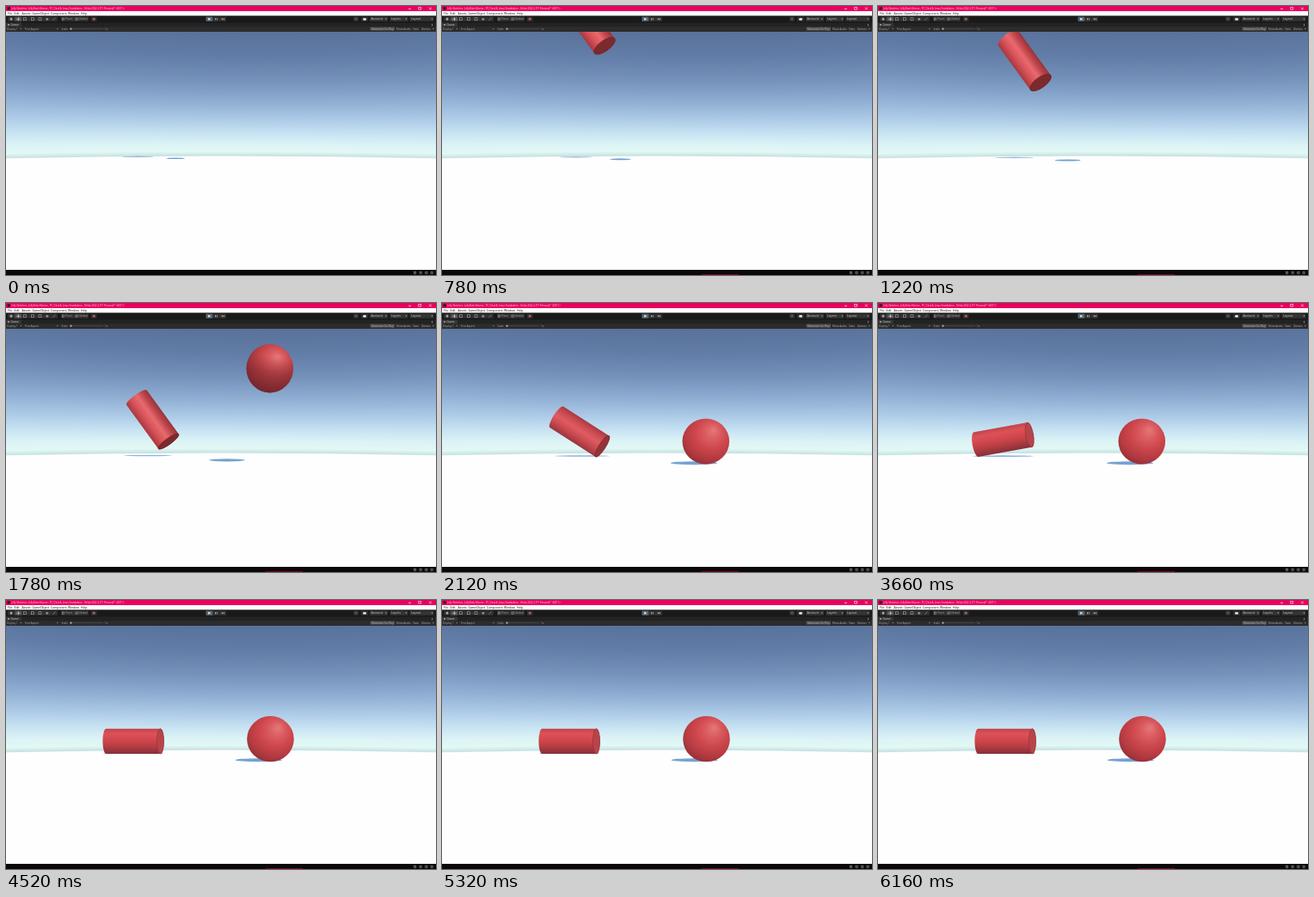
An HTML page with a canvas for the animation above (6180 ms loop, 500x313 px).

```html
<!DOCTYPE html>
<html lang="en">
<head>
<meta charset="utf-8">
<title>Falling shapes</title>
<style>
html, body { margin: 0; width: 100%; height: 100%; overflow: hidden; background: #000; }
canvas { display: block; width: 500px; height: 313px; }
</style>
</head>
<body>
<canvas id="stage" width="500" height="313"></canvas>
<script>
const LOOP = 6.18, W = 500, H = 313;
const VIEW = { top: 30, bottom: 307 };
const stage = document.getElementById('stage').getContext('2d');

const lerp = (a, b, u) => a + (b - a) * u;
const clamp = (v, a = 0, b = 1) => Math.min(b, Math.max(a, v));
const rad = deg => deg * Math.PI / 180;

// Piecewise linear curve through [position, value] points
function along(points, x) {
  if (x <= points[0][0]) return points[0][1];
  for (let i = 1; i < points.length; i++) {
    const [x0, y0] = points[i - 1], [x1, y1] = points[i];
    if (x <= x1) return lerp(y0, y1, (x - x0) / (x1 - x0));
  }
  return points[points.length - 1][1];
}

function mix(a, b, u) {
  const part = (c, i) => parseInt(c.substr(1 + 2 * i, 2), 16);
  return 'rgb(' + [0, 1, 2].map(i => Math.round(lerp(part(a, i), part(b, i), u))) + ')';
}

function stops(gradient, list) {
  list.forEach(([at, color]) => gradient.addColorStop(at, color));
  return gradient;
}

function rect(c, x, y, w, h, color) {
  c.fillStyle = color;
  c.fillRect(x, y, w, h);
}

function oval(c, x, y, rx, ry, color) {
  c.fillStyle = color;
  c.beginPath();
  c.ellipse(x, y, rx, ry, 0, 0, 2 * Math.PI);
  c.fill();
}

function label(c, text, x, y, size, color) {
  c.font = size + 'px "Open Sans", "Noto Sans", sans-serif';
  c.fillStyle = color;
  c.fillText(text, x, y);
}

function frameBox(c, x, y, w, h, color) {
  c.strokeStyle = color;
  c.lineWidth = 0.6;
  c.strokeRect(x, y, w, h);
}

function triangle(c, x, y, w, h, color, down) {
  c.fillStyle = color;
  c.beginPath();
  c.moveTo(x, y);
  if (down) { c.lineTo(x + w, y); c.lineTo(x + w / 2, y + h); }
  else { c.lineTo(x + w, y + h / 2); c.lineTo(x, y + h); }
  c.fill();
}

function drawSky(c) {
  const colors = [[0, '#58719a'], [0.2, '#617ca6'], [0.4, '#7592bb'], [0.58, '#91b0d4'],
    [0.72, '#afcde8'], [0.83, '#cae5f3'], [0.91, '#ddf4f6'], [0.965, '#e1f8f4'], [1, '#c4dfe1']];
  for (let x = 0; x < W; x += 2) {
    const bend = 0.0002 * (x - 300) ** 2;
    const g = c.createLinearGradient(0, 29 - bend, 0, 174.5 + 0.00005 * (x - 250) ** 2);
    rect(c, x, VIEW.top, 2, 150, stops(g, colors));
  }
  c.fillStyle = '#fefefe';
  c.beginPath();
  c.moveTo(0, 177.3);
  c.quadraticCurveTo(250, 171.7, W, 177.3);
  c.lineTo(W, VIEW.bottom);
  c.lineTo(0, VIEW.bottom);
  c.fill();
}

function drawTitle(c) {
  rect(c, 0, 0, W, 6, '#ea005e');
  rect(c, 1.5, 1.2, 3.2, 3.2, '#222');
  label(c, 'Jelly Sketches - JellySketchScene - PC, Desk & Linux Standalone - Veldo 2022.2.7f1 Personal* <DX11>',
    6.5, 4.2, 2.85, '#ffe4ee');
  rect(c, 468, 2.8, 3, 0.7, '#fff');
  frameBox(c, 479.8, 1.5, 2.6, 2.6, '#fff');
  c.strokeStyle = '#fff';
  c.beginPath();
  c.moveTo(492, 1.5); c.lineTo(494.8, 4.3);
  c.moveTo(494.8, 1.5); c.lineTo(492, 4.3);
  c.stroke();

  rect(c, 0, 6, W, 5.5, '#fff');
  [['File', 2], ['Edit', 9.5], ['Assets', 18.5], ['GameObject', 30.5], ['Component', 52],
    ['Window', 72], ['Help', 87]].forEach(([s, x]) => label(c, s, x, 10, 3.4, '#111'));
}

function drawToolbar(c) {
  const ink = '#a5a5a5';
  rect(c, 0, 11.5, W, 8, '#191919');
  rect(c, 2, 12.6, 58, 5.2, '#303030');
  rect(c, 10.3, 12.6, 8, 5.2, '#505050');
  oval(c, 6, 15.2, 1.4, 1.6, ink);
  rect(c, 12.2, 14.9, 4.4, 0.7, '#ccc');
  rect(c, 14.05, 13, 0.7, 4.4, '#ccc');
  [22, 31, 39.5].forEach(x => frameBox(c, x - 1.5, 13.7, 3, 3, ink));
  oval(c, 47.8, 15.2, 1.5, 1.5, '#888');
  c.strokeStyle = ink;
  c.beginPath();
  c.moveTo(54.5, 16.8); c.lineTo(57.5, 13.6);
  c.stroke();

  rect(c, 64, 12.6, 32, 5.2, '#303030');
  frameBox(c, 65.4, 14, 2.2, 2.2, ink);
  label(c, 'Pivot', 69, 16.4, 3.4, '#a5a5a5');
  frameBox(c, 81, 14, 2.2, 2.2, ink);
  label(c, 'Global', 84.5, 16.4, 3.4, '#a5a5a5');
  rect(c, 99, 12.6, 6.5, 5.2, '#303030');
  rect(c, 100.8, 14, 2.8, 2.4, '#b0605f');

  rect(c, 232.5, 12.6, 8, 5.2, '#566673');
  rect(c, 240.8, 12.6, 15.4, 5.2, '#303030');
  triangle(c, 235.3, 13.7, 2.8, 3, '#fff');
  rect(c, 243.2, 14, 0.8, 2.5, '#bbb');
  rect(c, 244.8, 14, 0.8, 2.5, '#bbb');
  triangle(c, 250.8, 14, 2.1, 2.5, '#bbb');
  rect(c, 253.1, 14, 0.7, 2.5, '#bbb');

  rect(c, 404, 12.6, 6, 5.2, '#2b2b2b');
  frameBox(c, 406, 14, 2, 2, '#777');
  rect(c, 413, 12.6, 8, 5.2, '#303030');
  oval(c, 417, 15.4, 2, 1.3, '#e8e8e8');
  [['Account', 423, 21], ['Layers', 446.5, 21], ['Layout', 469.5, 28]].forEach(([s, x, w]) => {
    rect(c, x, 12.6, w, 5.2, '#343434');
    label(c, s, x + 1.5, 16.4, 3.6, '#d0d0d0');
    triangle(c, x + w - 3, 14.6, 1.8, 1.3, '#c0c0c0', true);
  });
}

function drawTabs(c) {
  rect(c, 0, 19.5, W, 4.7, '#232323');
  rect(c, 0, 19.5, 18, 4.7, '#353535');
  oval(c, 3, 21.8, 1.2, 0.9, '#aaa');
  label(c, 'Game', 5.5, 23, 3.3, '#cfcfcf');
  rect(c, 495, 20.8, 0.8, 2.4, '#999');

  rect(c, 0, 24.2, W, VIEW.top - 24.2, '#2c2c2c');
  label(c, 'Display 1', 1, 27.8, 3, '#aaa');
  label(c, 'Free Aspect', 22, 27.8, 3, '#aaa');
  triangle(c, 16.5, 26, 1.6, 1.2, '#aaa', true);
  triangle(c, 59, 26, 1.6, 1.2, '#aaa', true);
  label(c, 'Scale', 64.5, 27.8, 3, '#aaa');
  rect(c, 76, 26.4, 37, 0.5, '#5c5c5c');
  oval(c, 75.5, 26.6, 1.2, 1.2, '#aaa');
  label(c, '1x', 115, 27.8, 3, '#aaa');
  rect(c, 423.5, 24.6, 28.5, 4, '#505050');
  [['Maximize On Play', 425], ['Mute Audio', 454], ['Stats', 473], ['Gizmos', 483]]
    .forEach(([s, x]) => label(c, s, x, 27.8, 3.1, '#b0b0b0'));
  triangle(c, 496, 26, 1.6, 1.2, '#aaa', true);

  rect(c, 0, VIEW.bottom, W, H - VIEW.bottom, '#0c0809');
  [475.5, 482, 488.7, 495].forEach(x => frameBox(c, x - 1, 309.3, 2.2, 2, '#a0a0a0'));
}

const backdrop = document.createElement('canvas');
backdrop.width = W;
backdrop.height = H;
[drawSky, drawTitle, drawToolbar, drawTabs].forEach(draw => draw(backdrop.getContext('2d')));

// Both bodies are already falling when the loop opens
const BEGIN = -0.54;
const travel = (t, pull) => pull * (t - BEGIN) ** 2;
const height = (body, t) => Math.max(0, travel(body.hit, body.pull) - travel(t, body.pull));

const ball = { x: 306.8, floor: 161, pull: 68, hit: 2.036 };
const tube = { half: 31.5, r: 14.6, pull: 31.5, hit: 1.844, flat: 2.45, rest: 4, floor: 179 };

function ballPose(t) {
  const h = height(ball, t);
  const nudge = clamp((t - 4) / 0.15) * 0.7;
  return { x: ball.x + nudge, y: ball.floor - h + nudge, h, ry: 26.6 + 1.7 * clamp(h / 85), nudge };
}

function tubePose(t) {
  let deg = 54;
  if (t > tube.rest) deg = 0;
  else if (t > tube.flat) deg = -25 * (t - tube.flat) * (tube.rest - t);
  else if (t > tube.hit) {
    const u = (t - tube.hit) / (tube.flat - tube.hit);
    deg = 54 * (1 - 0.75 * u - 0.25 * u * u);
  }
  const a = rad(deg);
  const low = tube.half * Math.abs(Math.sin(a)) + tube.r * Math.cos(a);
  const h = height(tube, t);
  return {
    x: along([[tube.hit, 170.5], [tube.flat, 147.2], [2.62, 146.5], [3.66, 145.2], [tube.rest, 148]], t),
    y: tube.floor - low - h, a, h,
    tilt: clamp(deg / 54),
    open: along([[1.22, 0.42], [1.78, 0.25], [2.4, 0.28], [3.25, 0.33], [4, 0.28]], t)
  };
}

// A higher body throws its shadow further off, toward one vanishing point
function drawShadow(c, h, x, y, rx, flat, color) {
  const near = 1 / (1 + 0.00336 * h);
  oval(c, lerp(131, x, near), lerp(171.2, y, near), rx * near, Math.max(0.55, rx * near * flat), color);
}

function drawShadows(c, b, p, t) {
  drawShadow(c, b.h, 293 + b.nudge, 186.2, 27, 0.072, '#74a2d1');
  const fallen = clamp((t - tube.hit) / 0.6);
  drawShadow(c, p.h, lerp(166, p.x, fallen), lerp(177.8, 178.2, fallen), lerp(29, 35, fallen), 0.025, '#8db3da');
}

function drawTube(c, p) {
  const { half, r } = tube, rx = r * p.open, k = p.tilt;
  c.save();
  c.translate(p.x, p.y);
  c.rotate(p.a);
  const shade = [[0, '#c2444a', '#96343a'], [0.2, '#dc5258', '#bd444a'], [0.45, '#d2474d', '#e86a6e'],
    [0.7, '#b63d43', '#d9545a'], [1, '#84303a', '#a8383e']];
  c.fillStyle = stops(c.createLinearGradient(0, -r, 0, r),
    shade.map(([at, lying, falling]) => [at, mix(lying, falling, k)]));
  c.beginPath();
  c.ellipse(-half, 0, rx, r, 0, Math.PI / 2, Math.PI * 1.5);
  c.ellipse(half, 0, rx, r, 0, -Math.PI / 2, Math.PI / 2);
  c.fill();
  oval(c, half, 0, rx, r, mix('#b8444a', '#7b2a2d', k));
  c.strokeStyle = mix('#8c3036', '#6a2226', k);
  c.lineWidth = 0.6;
  c.stroke();
  c.restore();
}

function drawBall(c, b) {
  const up = clamp(b.h / 85);
  const g = c.createRadialGradient(b.x + 9, b.y - 13, 1, b.x + 4, b.y - 5, 34);
  stops(g, [[0, '#e47578'], [0.25, '#da5b5f'], [0.55, mix('#cd464c', '#c4464b', up)],
    [0.82, mix('#ba3d43', '#a53a3f', up)], [1, mix('#a0353b', '#8c2f34', up)]]);
  oval(c, b.x, b.y, 27.3, b.ry, g);
  // Underside seen from below
  const dark = alpha => `rgba(95,28,34,${alpha})`;
  const under = stops(c.createLinearGradient(b.x + 4, b.y - b.ry * 0.5 * up, b.x - 3, b.y + b.ry),
    [[0, dark(0)], [0.45, dark(0.05 + 0.3 * up)], [1, dark(0.2 + 0.35 * up)]]);
  oval(c, b.x, b.y, 27.3, b.ry, under);
}

function draw(t) {
  const c = stage;
  c.drawImage(backdrop, 0, 0);
  if (t >= 0.64) rect(c, 302, 312, 43, 1, '#7a0036');
  c.save();
  c.beginPath();
  c.rect(0, VIEW.top, W, VIEW.bottom - VIEW.top);
  c.clip();
  const b = ballPose(t), p = tubePose(t);
  drawShadows(c, b, p, t);
  drawTube(c, p);
  drawBall(c, b);
  c.restore();
}

function tick() {
  draw(performance.now() / 1000 % LOOP);
  requestAnimationFrame(tick);
}
tick();
</script>
</body>
</html>
```
